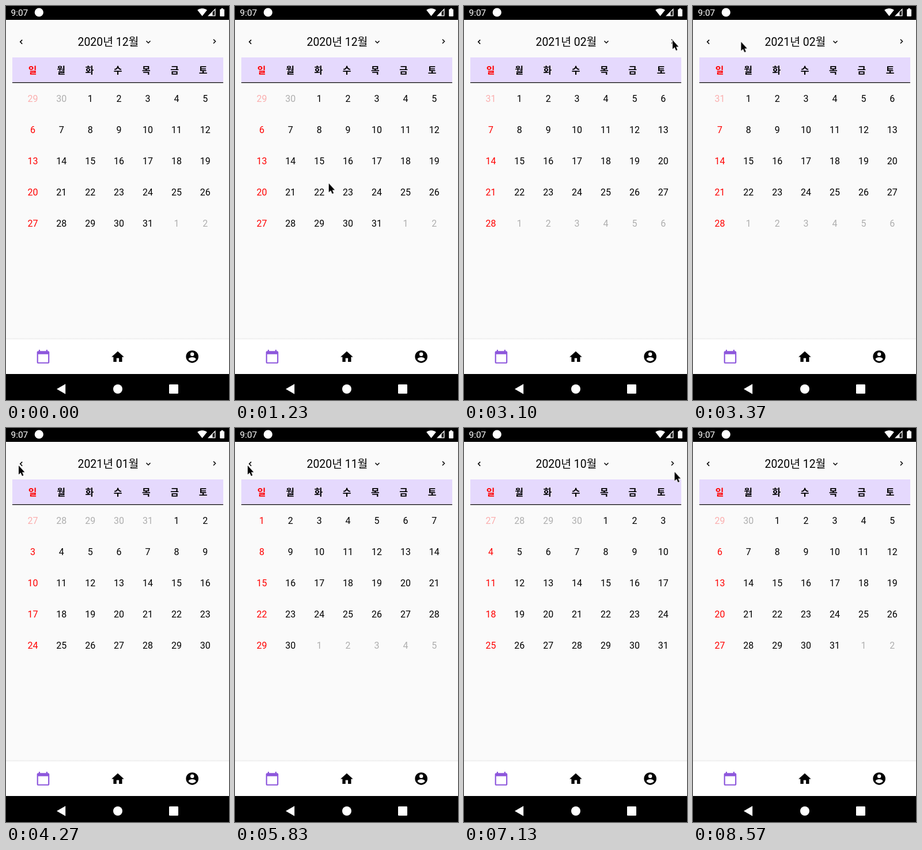
These frames come from a looping animation (387 by 682 pixels, 8610 ms). An HTML page:

```html
<!DOCTYPE html>
<html lang="ko">
<head>
<meta charset="utf-8">
<title>달력</title>
<style>
html, body { margin: 0; width: 100%; height: 100%; overflow: hidden; background: #fafafa; }
svg { display: block; width: 100vw; height: 100vh; font-family: Roboto, "Noto Sans CJK KR", "Noto Sans CJK", sans-serif; }
.mid { text-anchor: middle; }
.day { font-size: 16px; }
.week { font-size: 16px; font-weight: 700; }
.title { font-size: 19.4px; }
.sun { fill: #f00; }
.out { opacity: .3; }
.line { fill: none; stroke: #000; stroke-width: 1.5; }

#months { animation: months 8610ms step-end infinite; }
#pointer { animation: show 8610ms step-end infinite, move 8610ms linear infinite; }

/* Each month is one page of a strip: October is page 0, February page 4. */
@keyframes months {
  0%      { transform: translateX(-774px); }
  27.062% { transform: translateX(-1161px); }
  36.005% { transform: translateX(-1548px); }
  49.593% { transform: translateX(-1161px); }
  58.420% { transform: translateX(-774px); }
  67.712% { transform: translateX(-387px); }
  76.655% { transform: translateX(0); }
  89.082% { transform: translateX(-387px); }
  97.561%, 100% { transform: translateX(-774px); }
}
@keyframes show {
  0%      { opacity: 0; }
  11.614% { opacity: 1; }
  99.530%, 100% { opacity: 0; }
}
@keyframes move {
  0%, 11.614% { transform: translate(22px, 482px); animation-timing-function: cubic-bezier(.3, .1, .3, 1); }
  20.906%, 36% { transform: translate(362px, 59px); animation-timing-function: cubic-bezier(.4, 0, .7, .9); }
  39.141% { transform: translate(84px, 62px); animation-timing-function: cubic-bezier(.15, .5, .4, 1); }
  42.973%, 76.655% { transform: translate(22px, 65px); animation-timing-function: cubic-bezier(.4, 0, .4, 1); }
  82.811%, 83.972% { transform: translate(365.5px, 76px); animation-timing-function: ease-in-out; }
  85.947%, 97.561% { transform: translate(357.5px, 60px); animation-timing-function: ease-in; }
  99.535%, 100% { transform: translate(240px, 300px); }
}
</style>
</head>
<body>
<svg viewBox="0 0 387 682" preserveAspectRatio="none">
  <defs>
    <linearGradient id="shade" x2="0" y2="1">
      <stop stop-color="#fafafa"/>
      <stop offset="1" stop-color="#ececec"/>
    </linearGradient>
  </defs>
  <rect width="387" height="682" fill="#fafafa"/>

  <!-- status bar -->
  <rect width="387" height="24" fill="#000"/>
  <g fill="#fff">
    <text x="8.5" y="17" font-size="15.4">9:07</text>
    <circle cx="57.3" cy="11" r="7.6"/>
    <path transform="translate(331.9 2) scale(.72)" d="M12 21.5 23.64 7C23.2 6.66 18.7 3 12 3S.81 6.66.36 7z"/>
    <path fill-rule="evenodd" d="M350 17.5 363.5 4v13.500zM358.500 10.800v5.400h3.600v-9z"/>
    <path d="M373.500 4h3.200v1.500h1.300q1 0 1 1v10.500q0 1-1 1h-5.800q-1 0-1-1v-10.500q0-1 1-1h1.300z"/>
  </g>

  <!-- calendar header -->
  <path class="line" d="M28.200 58.600 24.700 62.100l3.500 3.500M360 57.700l3.500 3.500-3.500 3.500M243.500 60.500l3.500 3.500 3.500-3.500"/>
  <rect x="11" y="89" width="366" height="43" fill="#e5d9fd"/>
  <rect x="11" y="132" width="366" height="1.2"/>
  <g id="week"></g>
  <g id="months"></g>

  <!-- tab bar -->
  <rect y="574" width="387" height="3" fill="url(#shade)"/>
  <rect y="577" width="387" height="60" fill="#fff"/>
  <path fill="#8d57dc" transform="translate(51.500 594) scale(1.08)" d="M20 3h-1V1h-2v2H7V1H5v2H4c-1.100 0-2 .9-2 2v16c0 1.100.9 2 2 2h16c1.100 0 2-.9 2-2V5c0-1.100-.9-2-2-2zm0 18H4V8h16z"/>
  <path transform="translate(181 594.500) scale(1.08)" d="M10 20v-6h4v6h5v-8h3L12 3 2 12h3v8z"/>
  <path transform="translate(310.200 594) scale(1.08)" d="M12 2a10 10 0 1 0 0 20 10 10 0 1 0 0-20zm0 3a3 3 0 1 1 0 6 3 3 0 1 1 0-6zm0 14.200c-2.500 0-4.710-1.280-6-3.220.03-1.990 4-3.080 6-3.080s5.970 1.090 6 3.080c-1.290 1.940-3.500 3.220-6 3.220z"/>

  <!-- system navigation -->
  <rect y="637" width="387" height="45" fill="#000"/>
  <g fill="#fff">
    <path d="M88 663 103.200 654.200v17.600z"/>
    <circle cx="194" cy="663" r="8"/>
    <rect x="283" y="655" width="16" height="16" rx="1.2"/>
  </g>

  <g id="pointer">
    <path d="M0 0v15.500l3.500-3.300 2.500 5.800 2.400-1-2.400-5.600h4.400z" stroke="#fff" stroke-width="1.6" stroke-linejoin="round" paint-order="stroke"/>
  </g>
</svg>
<script>
const text = (x, y, cls, str) => `<text x="${x}" y="${y}" class="mid ${cls}">${str}</text>`;

function monthPage(index) {
  const first = new Date(2020, 9 + index, 1);
  const year = first.getFullYear(), month = first.getMonth();
  const label = `${year}년 ${String(month + 1).padStart(2, "0")}월`;
  let out = text(177.5, 69, "title", label);
  for (let i = 0; i < 35; i++) {
    const date = new Date(year, month, 1 - first.getDay() + i);
    const col = i % 7, row = Math.floor(i / 7);
    const cls = "day" + (col ? "" : " sun") + (date.getMonth() === month ? "" : " out");
    out += text(46.4 + col * 49.9, 166 + row * 54, cls, date.getDate());
  }
  return `<g transform="translate(${index * 387})">${out}</g>`;
}

document.getElementById("week").innerHTML = [..."일월화수목금토"]
  .map((name, i) => text(46.2 + i * 49.3, 116.5, i ? "week" : "week sun", name)).join("");
document.getElementById("months").innerHTML = [0, 1, 2, 3, 4].map(monthPage).join("");
</script>
</body>
</html>
```
